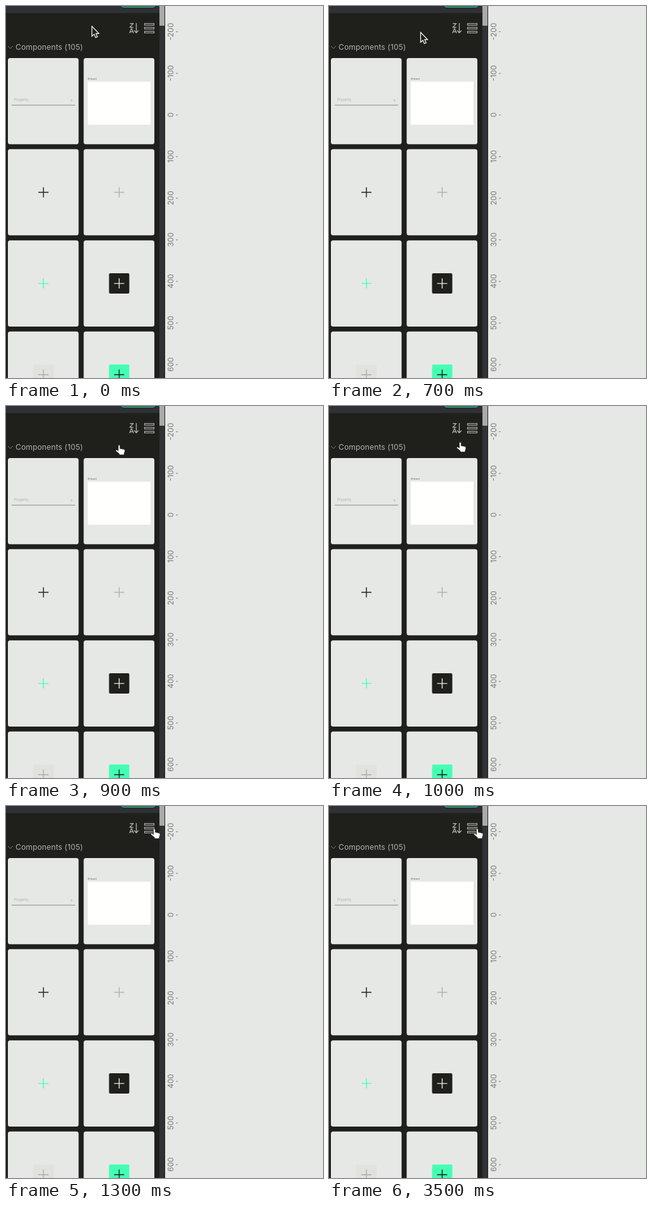
An HTML page that plays this animation: 500 by 586 pixels, repeating every 4500 ms.

```html
<!DOCTYPE html>
<html lang="en">
<head>
<meta charset="utf-8">
<title>Component panel: grid and list view</title>
<style>
  html, body { margin: 0; height: 100%; overflow: hidden; background: #e6e8e5; }
  svg { display: block; }
  text { font: 12px Inter, "Open Sans", sans-serif; letter-spacing: .15px; fill: #b1b2b0; }
</style>
</head>
<body>
<svg id="stage" width="500" height="586" viewBox="0 0 500 586"></svg>
<script>
const PALE = '#e6e8e5', DARK = '#1f201c', GREY = '#b1b2b0', GREEN = '#43ffb4',
      DIM = '#e1e1de', WHITE = '#fffffd';

const rect = (x, y, w, h, fill, r = 0) =>
  `<rect x="${x}" y="${y}" width="${w}" height="${h}" rx="${r}" fill="${fill}"/>`;
const line = (d, color, width = 1.3) =>
  `<path d="${d}" fill="none" stroke="${color}" stroke-width="${width}"/>`;
const plus = (x, y, r, color, width) =>
  line(`M${x - r} ${y}h${2 * r}M${x} ${y - r}v${2 * r}`, color, width);
const text = (x, y, s, attrs = '') => `<text x="${x}" y="${y}" ${attrs}>${s}</text>`;
const box = (x, y, w, h) => `M${x} ${y}h${w}v${h}h${-w}z`;

// Icon buttons: [plus colour, square colour]
const icons = {
  'basic-default': [DARK], 'basic-disabled': [GREY], 'basic-hover': [GREEN],
  'dark-default': [PALE, DARK], 'dark-disabled': ['#adadab', DIM], 'dark-hover': [DARK, GREEN],
  'light-default': [DARK, '#e2e1dc'], 'light-disabled': [GREY, DIM], 'light-hover': [DARK, GREEN]
};
// Bar buttons: [bar colour, label colour]
const bars = {
  'primary-default': [GREEN, '#28624a'], 'primary-disabled': ['#7df5c6', '#63b798'],
  'primary-hover': ['#1f201c', '#777a75'], 'secondary-default': [WHITE, '#777874'],
  'secondary-disabled': ['#e3e2de', '#bdbdba']
};

function ruler() {
  let s = '';
  for (let k = 0; k < 9; k++) {
    const y = 40.6 + 65.55 * k;
    s += text(0, 0, (k - 2) * 100,
      `transform="translate(263.5 ${y - .3}) rotate(-90)" text-anchor="middle" style="fill:#777b79;letter-spacing:0"`);
    s += line(`M268 ${y}h3`, '#777b79', 1);
  }
  return s;
}

function frame() {
  return rect(0, 0, 251, 586, DARK) + rect(0, 0, 242, 11, '#2e3236') +
    `<rect x="183" y="-20" width="51" height="21.5" rx="2" fill="${DARK}" stroke="${GREEN}"/>` +
    rect(242, 0, 8, 586, '#313236') +
    line('M195.3 27.7h5.2l-5 5.9h5.4M194.7 42.8l3.3-7.2 3.3 7.2M196 40.6h4', GREY) +
    line('M205.5 27v15M202 38.5l3.5 3.7 3.5-3.7', GREY) +
    line('M3 63l4 4 4-4', '#777975', 1) +
    text(15, 69, 'Components (105)') + ruler();
}

function gridView() {
  let s = rect(242, 0, 8, 31, '#aaaaa8') +
    line([27.5, 33.5, 39.9].map(y => box(218.5, y, 15, 2.6)).join(''), GREY, 1.1);
  const tiles = Object.values(icons);
  for (let i = 0; i < 8; i++) {
    const x = 3 + 119.5 * (i % 2), y = 82 + 143.6 * (i >> 1);
    s += rect(x, y, 111.5, 135.7, PALE, 3.5);
    if (i < 2) continue;
    // The last row shows the disabled and hover icons of the dark set.
    const [fg, bg] = tiles[i - 2];
    const cx = x + 56, cy = y + 67.9;
    if (bg) s += rect(cx - 16, cy - 16, 32, 32, bg, 2);
    s += plus(cx, cy, 8, fg, 1.4);
  }
  return s + text(12.5, 150, 'Property', 'style="font-size:5.6px;letter-spacing:0"') +
    plus(103.5, 148.6, 2, GREY, .7) + line('M9 156.2h100', '#a7a8a6', 1.4) +
    text(129, 116, 'Artboard', 'style="font-size:3.3px;letter-spacing:0;fill:#555"') +
    rect(129, 119, 99, 68, WHITE);
}

function listView() {
  let s = rect(242, 0, 8, 89, '#aaaaa8') +
    line([218.7, 228].map(x => [27.6, 36.6].map(y => box(x, y, 5.8, 5.8)).join('')).join(''), GREY);
  let y = 94;
  const row = (name, art) => {
    s += rect(3, y - 12, 24, 24, PALE, 3.5) + art + text(35, y + 4, name);
    y += 32;
  };
  row('add-property', line('M5 95.5h20', '#d3d4d1', .8));
  row('Artboard', rect(5, 120, 20, 13, WHITE));
  for (const [name, [fg, bg]] of Object.entries(icons))
    row('button-icon-' + name, (bg ? rect(5, y - 10, 20, 20, bg, 1.5) : '') + plus(15, y, 5, fg, 1));
  for (const [name, [bg, fg]] of Object.entries(bars))
    row('button-' + name, rect(5, y - 2.2, 20, 4.4, bg, .5) + line(`M11 ${y}h8`, fg, .8));
  return s;
}

const arrow = `<path id="arrow" d="M.5 .5V16.2L4 13l2.4 5.2 2.8-1.2L6.9 11.9h4.6z" fill="${DARK}" stroke="#fff" stroke-width="1.2"/>`;
const hand = `<path id="hand" d="M5 2c0-1.9 2.9-1.9 2.9 0v4l5.6 1.1c1.5.3 2 1.3 2 2.5 0 1.9-.8 2.9-1.2 4.1V16H6.6v-1.8L1.3 10c-.8-1.2.5-2.4 1.8-1.8L5 9.5z" fill="#fff" stroke="${DARK}" stroke-width=".8"/>`;

const stage = document.getElementById('stage');
stage.innerHTML = frame() + `<g id="grid">${gridView()}</g><g id="list">${listView()}</g>` + arrow + hand;
const $ = id => document.getElementById(id);
const show = (id, on) => $(id).setAttribute('display', on ? 'inline' : 'none');

// Pointer positions, one every 100 ms from 500 ms on; the first three use the arrow.
const track = [[135, 31.5], [140, 36.5], [144, 41], [147.5, 46], [172, 61],
               [200.5, 56.5], [214, 53.5], [221, 45], [227.5, 35.3]];

function draw(now) {
  const t = now % 4500;
  const step = Math.max(0, Math.min(track.length - 1, Math.floor(t / 100) - 5));
  const isArrow = step < 3, isList = t >= 2000 && t < 3500;
  show('arrow', isArrow);
  show('hand', !isArrow);
  show('grid', !isList);
  show('list', isList);
  $(isArrow ? 'arrow' : 'hand').setAttribute('transform', `translate(${track[step]})`);
}

const start = performance.now();
function tick() {
  draw(performance.now() - start);
  requestAnimationFrame(tick);
}
tick();
</script>
</body>
</html>
```
